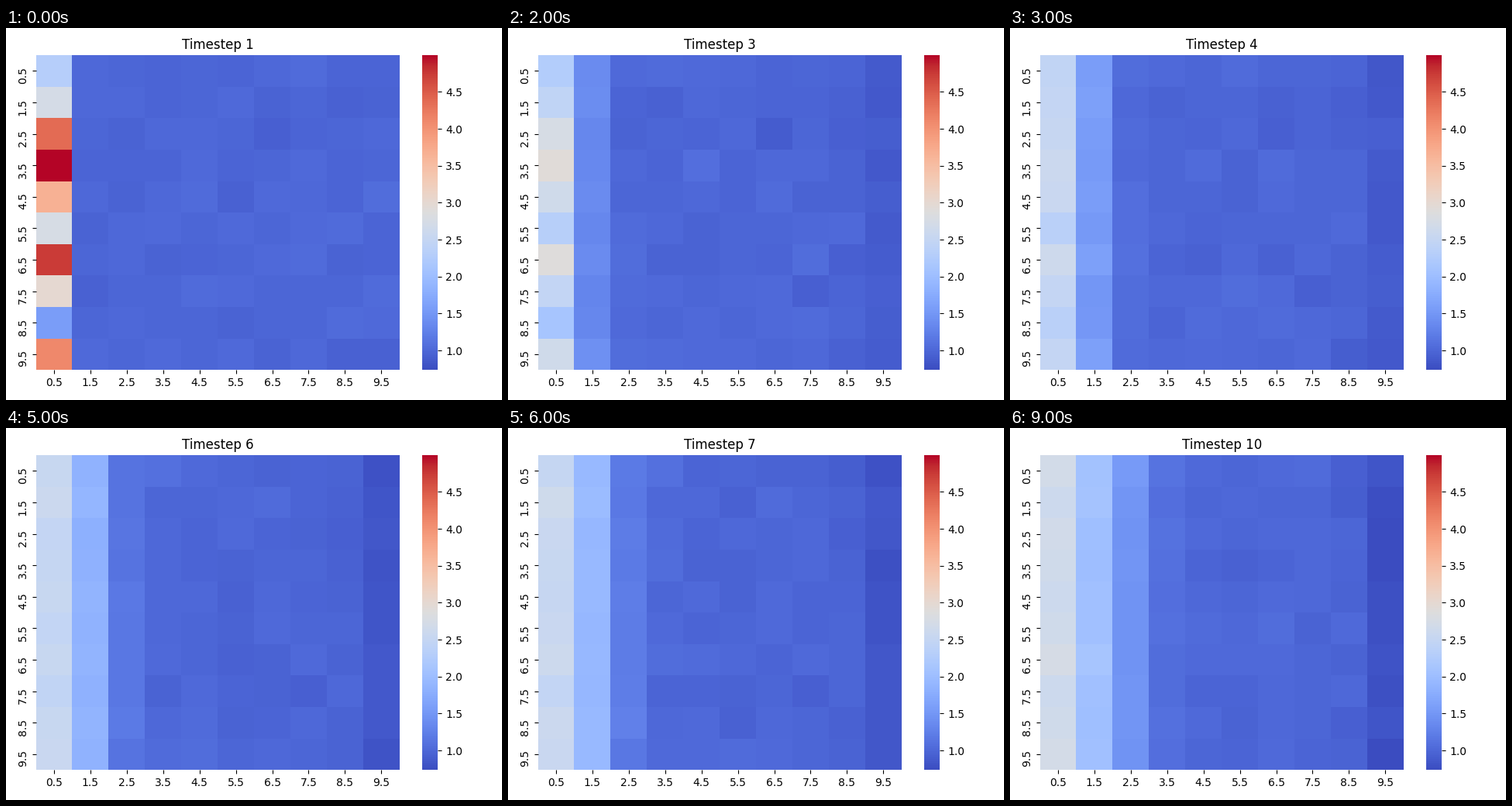
These frames come from a looping animation (640x480 px, 10 s). A matplotlib script:

```python
import numpy as np
import matplotlib.pyplot as plt
from matplotlib.animation import FuncAnimation

SIZE = 10
STEPS = 10
W, H, DPI = 640, 480, 100
VMIN, VMAX = 0.735, 4.997

# Left column at the start, top to bottom
START = np.array([2.25, 2.67, 4.32, 5.0, 3.6, 2.7, 4.68, 2.96, 1.53, 4.05])


def make_noise(keep=0.75, spread=0.032):
    """Cell noise that drifts slowly from step to step."""
    rng = np.random.default_rng(7)
    noise = [rng.normal(0, spread, (SIZE, SIZE))]
    for _ in range(STEPS - 1):
        fresh = rng.normal(0, spread, (SIZE, SIZE))
        noise.append(keep * noise[-1] + np.sqrt(1 - keep**2) * fresh)
    return noise


NOISE = make_noise()


def field_at(t):
    field = 1 + NOISE[t]
    # Columns fill up from the left, while the right edge drains
    field[:, 1] += 1.06 * (1 - np.exp(-(t / 3.6) ** 1.5))
    field[:, 2] += 0.006 * t**2
    field[:, 3] += 0.0012 * t**2
    field[:, 8] -= 0.015 * np.sqrt(t)
    field[:, 9] -= 0.065 * np.sqrt(t)
    # The left column evens out around a slowly rising level
    contrast = np.exp(-0.5 * t**1.5)
    level = 2.38 + 0.031 * t + 1.05 * np.exp(-t)
    field[:, 0] = (level + contrast * (START - START.mean())
                   + 1.8 * (1 - contrast) * NOISE[t][:, 0])
    return field


fig, ax = plt.subplots(figsize=(W / DPI, H / DPI), dpi=DPI)
mesh = ax.pcolormesh(field_at(0), cmap="coolwarm", vmin=VMIN, vmax=VMAX)
ax.set(xlim=(0, SIZE), ylim=(SIZE, 0))
ax.spines[:].set_visible(False)

centers = np.arange(SIZE) + 0.5
names = [f"{c:.1f}" for c in centers]
ax.set_xticks(centers, names)
ax.set_yticks(centers, names)
plt.setp(ax.get_yticklabels(), rotation="vertical")

bar = fig.colorbar(mesh, ax=ax)
bar.outline.set_linewidth(0)
title = ax.set_title("Timestep 1")
fig.tight_layout()
fig.subplots_adjust(left=38.55 / W, top=444.9 / H)


def update(i):
    mesh.set_array(field_at(i))
    title.set_text(f"Timestep {i + 1}")
    return mesh, title


anim = FuncAnimation(fig, update, frames=STEPS, interval=1000, repeat=True,
                     repeat_delay=0, blit=False)
plt.show()
```
